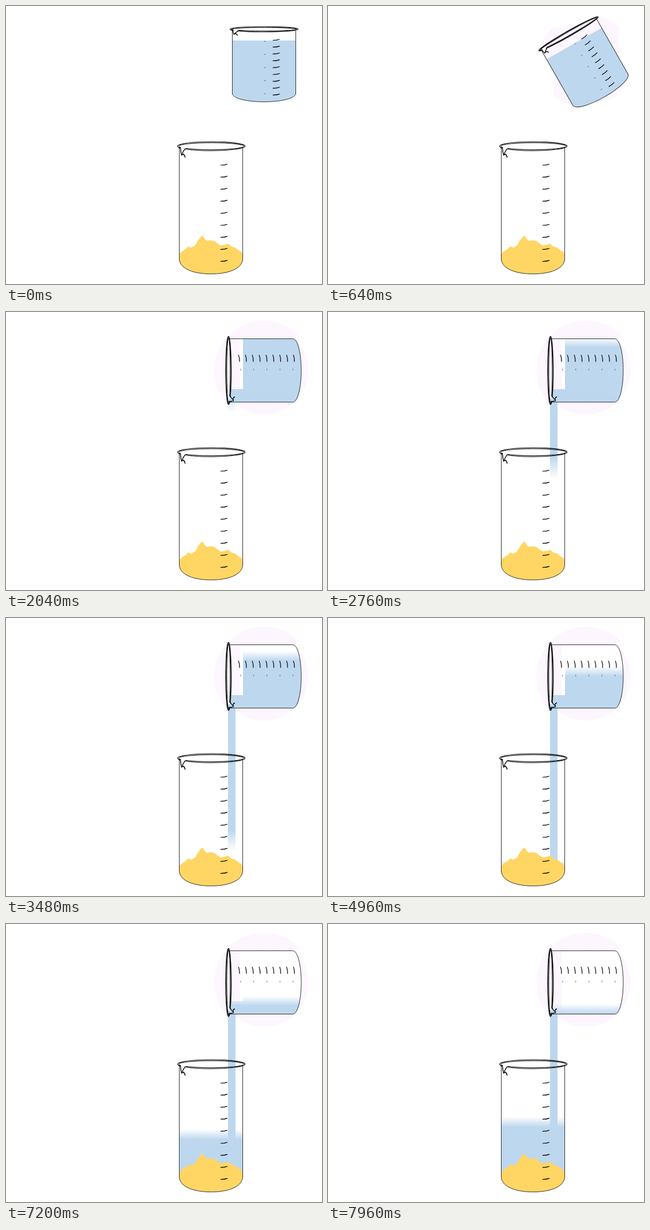
Recreate the animation shown at these times as an HTML page with a canvas. Size 548 px wide and 483 px high, loop 8 s.

```html
<!DOCTYPE html>
<html lang="en">
<head>
<meta charset="utf-8">
<title>Pouring water onto sand</title>
<style>
  html, body { margin: 0; width: 100%; height: 100%; overflow: hidden; background: #fff; }
  canvas { display: block; }
</style>
</head>
<body>
<canvas id="stage" width="548" height="483"></canvas>
<script>
const ctx = document.getElementById('stage').getContext('2d');

const LOOP = 8000, STEP = 40;
const TILT_END = 1940, POUR_START = 1960, FILL_START = 3380;
const WATER = '189,215,238', SAND = '#ffd663', TRAIL = '#fdf6ff';
const INK = '#000', GLASS = '#333';
const PIVOT = { x: 447.25, y: 101.75 };

const cupBody = new Path2D(
  'M392.5 43V152C393 161 420 166.5 447.5 166.5S502 161 502.5 152V43');
const cupWater = new Path2D(
  'M392.5 60V152C393 161 420 166.5 447.5 166.5S502 161 502.5 152V60Z');
const cupLip = new Path2D(
  'M389.5 41.5L393.5 42.5Q394 46 395 49Q397 49.5 398 46.5L402.5 43.5M396 48Q401 48 401.5 51.5');
const pouredWater = new Path2D(
  'M388 134H411V46.5H498C507 47 512.2 74 512.2 102S507 156 498 156.5H388Z');

const jarBody = new Path2D(
  'M300.5 246V440C302 457 326 465.5 355.5 465.5S409 457 410.5 440V246');
const jarLip = new Path2D(
  'M299 245.5L302.5 247Q303 254 304.5 259Q306 259.5 306.5 254.5L310.5 248M305.5 257Q310.5 258 310.5 263.5');
const sand = new Path2D(
  'M301 430L307 425L312 422L316 417.5L321 420L328 416L333 407L337 402L341 398.5L345 405.5' +
  'L349 408L354 407L361 408L366 412L372 416L379 415L385 413L391 418' +
  'L398 420L403 424.5L408 427L410.5 431V440C409 457 385 465.5 355.5 465.5S302 457 300.5 440Z');

function stroke(path, width = 1, color = INK) {
  ctx.lineWidth = width;
  ctx.strokeStyle = color;
  ctx.stroke(path);
}

// Ellipse left open where the spout breaks the front edge.
function rim(x, y, rx, ry, width) {
  const path = new Path2D();
  path.ellipse(x, y, rx, ry, 0, 0.88 * Math.PI, 2.79 * Math.PI);
  stroke(path, width);
}

function ticks(x, y, gap) {
  for (let i = 0; i < 9; i++) {
    const ty = y + i * gap;
    stroke(new Path2D(`M${x} ${ty + 0.8}Q${x + 7} ${ty + 1} ${x + 12} ${ty - 1}`), 1.2);
  }
}

// Vertical gradient of water that is clear at one height and solid at the other.
function fade(clearY, solidY) {
  const g = ctx.createLinearGradient(0, clearY, 0, solidY);
  g.addColorStop(0, `rgba(${WATER},0)`);
  g.addColorStop(1, `rgb(${WATER})`);
  return g;
}

function tilted(angle, draw) {
  ctx.save();
  ctx.translate(PIVOT.x, PIVOT.y);
  ctx.rotate(-angle * Math.PI / 180);
  ctx.translate(-PIVOT.x, -PIVOT.y);
  draw();
  ctx.restore();
}

// Pale area left behind by the turning beaker.
function drawTrail(angle) {
  if (angle <= 0) return;
  const shape = new Path2D(cupBody);
  shape.ellipse(447.5, 40.3, 59.3, 4.8, 0, 0, 2 * Math.PI);
  ctx.fillStyle = TRAIL;
  const count = Math.ceil(angle / 2);
  for (let i = 0; i <= count; i++) {
    tilted(angle * i / count, () => {
      ctx.fill(shape);
      stroke(shape, 2, TRAIL);
    });
  }
}

function drawCup(angle, t) {
  const pouring = t >= POUR_START;
  tilted(angle, () => {
    ctx.fillStyle = pouring ? '#fff' : `rgb(${WATER})`;
    ctx.fill(cupWater);
  });
  if (pouring) {
    const top = 29.6 + (t - POUR_START) * 0.0182;
    ctx.fillStyle = fade(top, top + 17);
    ctx.fill(pouredWater);
  }
  tilted(angle, () => {
    stroke(cupBody, 1, GLASS);
    rim(447.5, 40.3, 59, 4.6, angle > 0 ? 1.5 : 1.1);
    rim(447.5, 40.4, 56.5, 3, 1);
    stroke(cupLip, 1.3);
    ticks(462.6, 58.7, 11.9);
    for (let i = 0; i < 5; i++) {
      stroke(new Path2D(`M447.5 ${61.4 + i * 22.75}h3`), 1, '#66727d');
    }
  });
}

function drawStream(t) {
  if (t < POUR_START) return;
  const front = 161 + (t - POUR_START) * 0.16;
  ctx.fillStyle = fade(front, front - 36);
  ctx.fillRect(385, 150, 13, Math.min(front, 430) - 150);
}

function drawJar(t) {
  if (t > FILL_START) {
    const level = 465 - (t - FILL_START) * 0.0284;
    ctx.save();
    ctx.clip(jarBody);
    ctx.fillStyle = fade(level, level + 18);
    ctx.fillRect(300, level, 111, 466 - level);
    ctx.restore();
  }
  drawStream(t);
  ctx.fillStyle = SAND;
  ctx.fill(sand);
  stroke(jarBody, 1, GLASS);
  rim(356, 243.5, 58.5, 7.8, 1.1);
  rim(356, 243.6, 56.5, 6, 1);
  stroke(jarLip, 1.4);
  ticks(372, 275.7, 20.9);
}

function render(t) {
  const angle = 90 * Math.min(t / TILT_END, 1);
  ctx.fillStyle = '#fff';
  ctx.fillRect(0, 0, 548, 483);
  drawTrail(angle);
  drawJar(t);
  drawCup(angle, t);
}

const start = performance.now();
function tick() {
  const t = (performance.now() - start) % LOOP;
  render(Math.floor(t / STEP) * STEP);
  requestAnimationFrame(tick);
}
tick();
</script>
</body>
</html>
```
